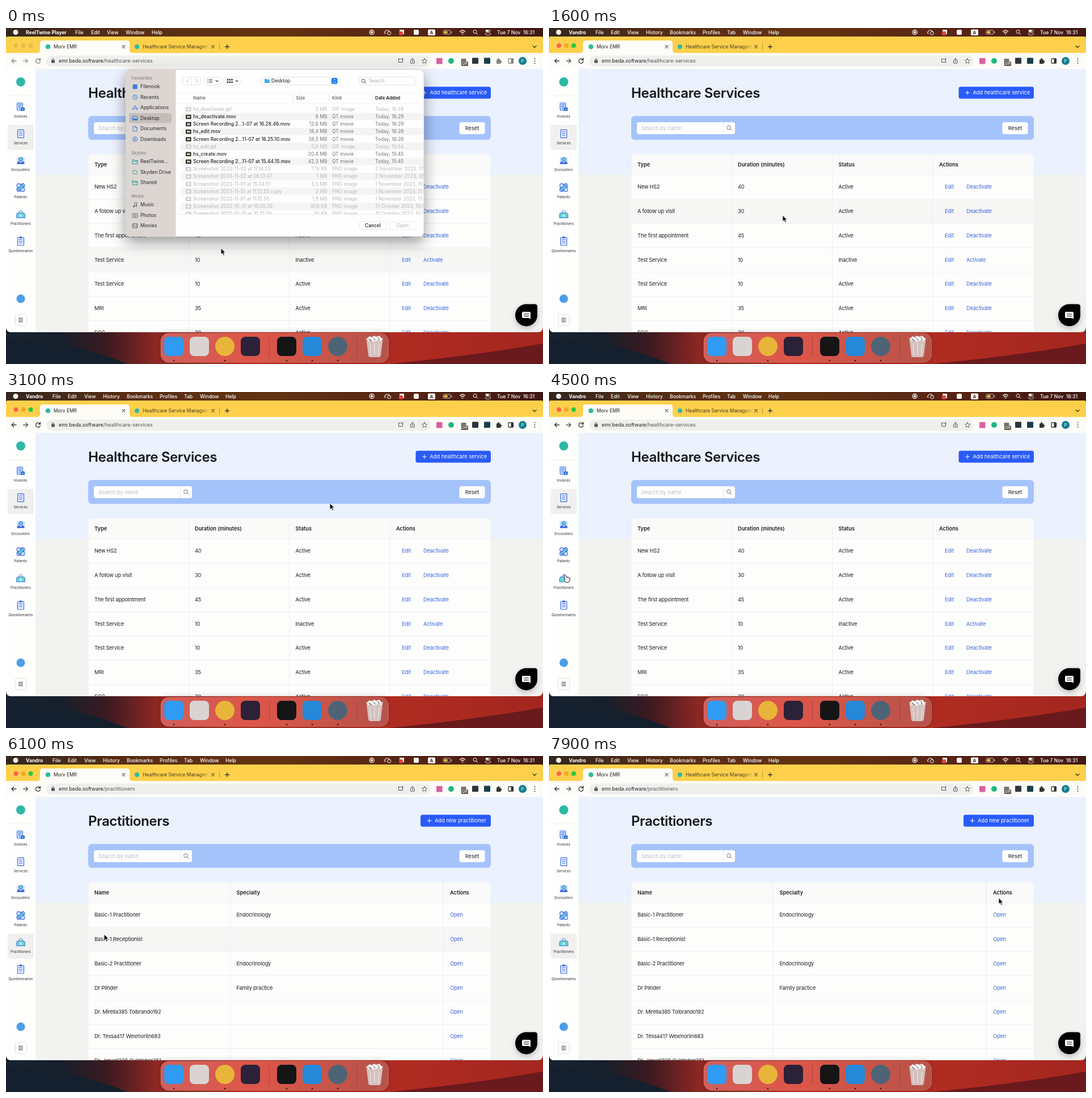
An HTML page that plays this animation: 947x592 px, repeating every 8 s.

```html
<!DOCTYPE html>
<html lang="en">
<head>
<meta charset="utf-8">
<title>Healthcare services walkthrough</title>
<style>
  html, body { margin: 0; width: 100%; height: 100%; overflow: hidden; background: #2a1216; }
  svg { display: block; width: 100%; height: 100%; }
  text { font-family: Inter, "Open Sans", sans-serif; white-space: pre; }
</style>
</head>
<body>
<svg id="stage" viewBox="0 0 947 592"></svg>
<script>
const LOOP = 8000, STEP = 100;
const LEAVE_DIALOG = 600, OPEN_PAGE = 4800, DATA_READY = 5500, LEAVE_MENU = 5500;
const INK = '#1d1d1f', LINK = '#3c65d9', BLUE = '#2a5bf8', LINE = '#efeff3';
const ROW_TOP = 259, ROW_H = 42.75;

const attrs = o => Object.entries(o).map(([k, v]) => ` ${k}="${v}"`).join('');
const rect = (x, y, w, h, fill, r = 0, o = {}) =>
  `<rect${attrs({ x, y, width: w, height: h, fill, rx: r, ...o })}/>`;
const circ = (cx, cy, r, fill, o = {}) => `<circle${attrs({ cx, cy, r, fill, ...o })}/>`;
const fill = (d, color, o = {}) => `<path${attrs({ d, fill: color, ...o })}/>`;
const line = (d, color, w = 1, o = {}) => `<path${attrs({
  d, fill: 'none', stroke: color, 'stroke-width': w,
  'stroke-linecap': 'round', 'stroke-linejoin': 'round', ...o })}/>`;
// y is the middle of the letters
const txt = (x, y, s, size, color = INK, o = {}) =>
  `<text${attrs({ x, y: (y + size * .35).toFixed(2), 'font-size': size, fill: color, ...o })}>${s}</text>`;
const body = (x, y, s, color = INK, o = {}) => txt(x, y, s, 9.2, color, { 'letter-spacing': -.15, ...o });
const group = (id, s, o = {}) => `<g${attrs({ id, ...o })}>${s}</g>`;
const at = (x, y, s) => `<g transform="translate(${x} ${y})">${s}</g>`;
const cross = (x, y, r, c) => line(`M${x - r} ${y - r}l${2 * r} ${2 * r}m0 ${-2 * r}l${-2 * r} ${2 * r}`, c, 1.1);
const plus = (x, y, r, c, w = 1.1) => line(`M${x - r} ${y}h${2 * r}M${x} ${y - r}v${2 * r}`, c, w);
const lens = (x, y, r, c) => circ(x - 1, y - 1, r, 'none', { stroke: c }) +
  line(`M${x - 1 + r * .7} ${y - 1 + r * .7}l${r * .9} ${r * .9}`, c);
const gradient = (id, ...stops) => `<linearGradient id="${id}">` + stops.map(([offset, color]) =>
  `<stop offset="${offset}" stop-color="${color}"/>`).join('') + '</linearGradient>';

const defs = `<defs>
  ${gradient('wall', [0, '#17232f'], [.1, '#15202c'], [.19, '#3d1a20'], [.28, '#8e2823'], [.45, '#c23a2a'], [.72, '#b02c22'], [1, '#a3261f'])}
  ${gradient('bar', [0, '#33271f'], [.2, '#552c14'], [.5, '#633312'], [.75, '#572414'], [1, '#3f1814'])}
  ${gradient('dock', [0, '#d05f5c'], [.4, '#de5648'], [1, '#b6524b'])}
  <linearGradient id="fade"><stop offset=".84" stop-color="#fdd04c" stop-opacity="0"/><stop offset="1" stop-color="#fdd04c"/></linearGradient>
  <clipPath id="page"><path d="M0 72H947V526q0 10-10 10H10Q0 536 0 526z"/></clipPath>
  <clipPath id="files"><rect x="300" y="135" width="436" height="193"/></clipPath>
  <filter id="shadow" x="-20%" y="-20%" width="140%" height="150%"><feDropShadow dx="0" dy="10" stdDeviation="13" flood-opacity=".4"/></filter>
  <filter id="soft" x="-40%" y="-60%" width="180%" height="260%"><feDropShadow dx="0" dy="4" stdDeviation="5" flood-opacity=".22"/></filter>
  <filter id="glow" x="-10%" y="-60%" width="120%" height="220%"><feDropShadow dx="0" dy="0" stdDeviation="6" flood-opacity=".22"/></filter>
</defs>`;

function menuBar() {
  const titles = (list, id) => group(id, list.map(([x, s], i) =>
    txt(x, 7.5, s, 8.6, '#fff', { 'font-weight': i ? 500 : 700 })).join(''));
  const W = '#f7f2f0';
  return rect(0, 0, 947, 16, 'url(#bar)') + circ(17, 7.5, 4.5, W) +
    titles([[35, 'ReelTwine Player'], [122, 'File'], [150, 'Edit'], [178, 'View'], [211, 'Window'], [257, 'Help']], 'menuA') +
    titles([[35, 'Vandro'], [82, 'File'], [109, 'Edit'], [138, 'View'], [171, 'History'], [213, 'Bookmarks'],
      [271, 'Profiles'], [314, 'Tab'], [342, 'Window'], [387, 'Help']], 'menuB') +
    circ(645, 7.5, 4, 'none', { stroke: W, 'stroke-width': 1.3 }) + rect(643, 5.5, 4, 4, W, 1) +
    line('M669 10q-3-2 0-4q1-3 4-2q3 0 3 3', W, 1.2) + circ(675.5, 9, 3, 'none', { stroke: W }) +
    rect(694, 3, 8, 8, W, 1) + rect(693, 6, 7, 7, '#e34234', 2) + rect(719, 3, 9, 9, W, 2) +
    rect(744, 2.5, 13, 10.5, W, 1.5) + txt(750.5, 7.8, 'A', 8, '#3c2723', { 'text-anchor': 'middle', 'font-weight': 600 }) +
    rect(771, 4, 13, 7, 'none', 2, { stroke: '#c9b9b3' }) + rect(772.5, 5.5, 6, 4, '#e9c544', 1) + rect(785, 6, 1.3, 3, '#c9b9b3') +
    line('M800.5 6.2q4.5-4 9 0M802.5 8.6q2.5-2.2 5 0', W, 1.3) + circ(805, 11, 1, W) + lens(828, 7.5, 3, W) +
    rect(845.5, 3, 9, 4, W, 2) + rect(845.5, 8.3, 9, 4, 'none', 2, { stroke: W, 'stroke-width': .8 }) +
    circ(852.3, 5, 1.4, '#4a2922') + txt(866, 7.5, 'Tue 7 Nov  16:31', 8.6, '#fff', { 'font-weight': 500 });
}

function browser() {
  const logo = (x, y, r) => circ(x, y, r, '#2db8a6');
  const lights = [['#ff5f57', 17.5], ['#f6a623', 30.5], ['#28c840', 43.5]];
  const nav = line('M18 58h-8m3.5-3.5L10 58l3.5 3.5', '#333', 1.3) +
    line('M30.500 58h8m-3.500-3.500l3.500 3.500l-3.500 3.500', '#555', 1.3) +
    line('M60 56a4 4 0 1 0 .4 3.200M60.500 53.500v3h-3', '#333', 1.3) +
    fill('M865 55.500h2.300q-.6-2.500 1.300-2.500t1.300 2.500h2.600v2.600q2-.7 2 1.200t-2 1.200v2.500h-7.500z', '#333') +
    rect(886, 54, 8.5, 8, 'none', 1, { stroke: '#333', 'stroke-width': 1.3 }) + rect(890.5, 54, 4, 8, '#333');
  const tools = line('M692.500 54.500v6h7v-3M692.500 54.500h3.500M699 53v3.500m-1.700-1.500l1.700 1.700l1.700-1.700', '#555') +
    line('M714.500 57h-1v5h6.500v-5h-1M716.800 60v-6.500m-2 2l2-2l2 2', '#555') +
    line('M738 53.500l1.400 2.900 3.100.4-2.300 2.200.6 3.100-2.800-1.500-2.800 1.500.6-3.100-2.300-2.200 3.100-.4z', '#555', .9) +
    rect(759, 53, 10.5, 10.5, '#dc5fa3', 1) + circ(785, 58, 5, '#1fb686') +
    rect(802.5, 54, 9, 7, '#777', 1) + rect(803, 59, 12, 8, '#625d50', 1.5) +
    txt(809, 63, 'Off', 6.5, '#fff', { 'text-anchor': 'middle' }) +
    rect(822, 52.5, 11, 10.5, '#2d3440', 1) + rect(843, 52.5, 11, 10.5, '#183f4b', 1);
  return rect(0, 15, 947, 57, '#fdd04c', 3) +
    fill('M55 44q5 0 5-5V27q0-5 5-5h148q5 0 5 5v12q0 5 5 5z', '#fdfcf7') + rect(0, 44, 947, 28, '#fdfcf9') +
    group('lightsOff', lights.map(l => circ(l[1], 31, 4, '#e5bd4b')).join('')) +
    group('lightsOn', lights.map(l => circ(l[1], 31, 4, l[0])).join('')) +
    logo(74, 33, 4.3) + txt(84, 33, 'Morv EMR', 8.4) + cross(207.5, 33, 2.4, '#444') +
    logo(231, 33, 4) + txt(241, 33, 'Healthcare Service Managem', 8.4, '#40391f') + rect(241, 26, 120, 14, 'url(#fade)') +
    cross(365, 33, 2.4, '#443c20') + rect(376, 27, 1, 12, '#b79840') + plus(390, 33, 3.5, '#333', 1.3) +
    line('M929 31.500l3 3l3-3', '#443c20', 1.3) +
    rect(71, 48.5, 678, 19.5, '#efefed', 9.7) +
    rect(80, 56.5, 6, 5, '#555', .8) + line('M81.300 56.500v-1.500q1.700-2.500 3.400 0v1.500', '#555') +
    `<text id="url" x="93" y="61" font-size="8.9" fill="#555"><tspan fill="#222">emr.beda.software</tspan><tspan id="path"></tspan></text>` +
    tools + group('nav', nav) +
    circ(911, 58, 7, '#147f90') + txt(911, 58, 'P', 7.5, '#fff', { 'text-anchor': 'middle' }) +
    [54, 58, 62].map(y => circ(932.5, y, 1, '#444')).join('');
}

function sidebar() {
  const b = '#3768dd', teal = '#64cfd2', pale = '#c9dcff';
  const doc = rect(-5.5, -7, 11, 14, '#e9f0ff', 1, { stroke: b, 'stroke-width': 1.1 }) + line('M-3-3.500h6M-3-.500h6M-3 2.500h6', b, .9);
  const icons = [
    ['Invoices', rect(-6.5, -7, 10, 13, pale, 1, { stroke: b }) + line('M-4-4h5M-4-1h5M-4 2h3', b) + rect(0, 1, 7, 6, b, 1) + circ(3.5, 4, 1.5, teal)],
    ['Services', doc],
    ['Encounters', rect(-7, -6, 14, 10, pale, 1) + circ(0, -2.5, 3.3, teal, { stroke: b }) + fill('M-7 6q1-4 4-5l3 3 3-3q3 1 4 5z', b)],
    ['Patients', [[-3.5, -3.5], [3.5, -3.5], [-3.5, 3.5], [3.5, 3.5]].map(p => circ(...p, 3.6, pale, { stroke: b, 'stroke-width': 1.1 })).join('') +
      rect(-2.3, -6, 4.6, 12, teal, 2, { transform: 'rotate(45)', stroke: b })],
    ['Practitioners', line('M-3-3q0-4 3-4t3 4', b) + fill('M-7.500 6v-6q0-3 4-3h7q4 0 4 3v6z', teal, { stroke: b, 'stroke-width': .8 }) + plus(0, 2, 2, '#fff', 1.4)],
    ['Questionnaires', doc + rect(-2.5, -8.5, 5, 3, b, 1)]
  ];
  return rect(0, 72, 52, 464, '#fefefd') + `<rect id="selected" x="3" width="46" height="44" rx="3" fill="#f0f0ee"/>` +
    circ(26, 95, 8, '#2db8a6') + line('M4 119.500h44', '#f3f2e6', 1) +
    icons.map(([name, art], i) => at(26, 139 + i * 47.4, art) +
      txt(25.8, 155.5 + i * 47.4, name, 6, '#2c2c31', { 'text-anchor': 'middle' })).join('') +
    circ(26, 477, 7.5, '#4a9fe8') + rect(16, 504.5, 20, 20, '#fff', 3, { stroke: '#dad8cf', 'stroke-width': .8 }) +
    line('M22.500 511.500h7M22.500 514.500h7M22.500 517.500h7', '#222', 1);
}

const headings = (y, cells) => cells.map(([x, s]) => body(x, y, s, INK, { 'font-weight': 600, 'letter-spacing': 0 })).join('');
const rules = (xs, bottom) => xs.map(x => line(`M${x} 223V${bottom}`, LINE, 1)).join('');
const rowLines = [...Array(7)].map((_, i) => line(`M146 ${ROW_TOP + i * ROW_H}H854`, LINE, 1)).join('');
const rowY = i => 280.2 + i * ROW_H;

function pageTop(title, action, x) {
  return txt(145, 114.5, title, 24, '#15171c', { 'font-weight': 600, 'letter-spacing': -.4 }) +
    rect(x, 103.5, 855 - x, 21, BLUE, 3.5) + plus(x + 15.5, 114, 3.4, '#fff', 1) +
    body(x + 25, 114, action, '#fff', { 'letter-spacing': 0 });
}

function services() {
  const rows = [['New HS2', 40], ['A follow up visit', 30], ['The first appointment', 45], ['Test Service', 10],
    ['Test Service', 10], ['MRI', 35], ['ECG', 30]];
  return pageTop('Healthcare Services', 'Add healthcare service', 722.5) +
    headings(240.5, [[156, 'Type'], [333, 'Duration (minutes)'], [510.5, 'Status'], [688, 'Actions']]) +
    rules([322.5, 499.5, 677], 536) + rowLines +
    rows.map(([name, min], i) => {
      const y = rowY(i), off = i === 3;
      return body(156, y, name) + body(333, y, min) + body(510.5, y, off ? 'Inactive' : 'Active') +
        body(698, y, 'Edit', LINK) + body(736, y, off ? 'Activate' : 'Deactivate', LINK);
    }).join('');
}

function practitioners() {
  const rows = [['Basic-1 Practitioner', 'Endocrinology'], ['Basic-1 Receptionist', ''], ['Basic-2 Practitioner', 'Endocrinology'],
    ['Dr Plinder', 'Family practice'], ['Dr. Mirella385 Tolbrando192', ''], ['Dr. Tessa417 Wexmorlin683', ''], ['Dr. Jorvall208 Quintober351', '']];
  const empty = '#d5d5d3';
  return pageTop('Practitioners', 'Add new practitioner', 731) +
    headings(240.5, [[156, 'Name'], [406.5, 'Specialty'], [783, 'Actions']]) +
    rules([395.5, 771], 259) +
    group('loaded', rules([395.5, 771], 536) + rowLines + rows.map(([name, field], i) =>
      body(156, rowY(i), name) + body(406.5, rowY(i), field) + body(783, rowY(i), 'Open', LINK)).join('')) +
    group('empty', line('M146 259H854', LINE) +
      `<ellipse cx="499.500" cy="312" rx="20" ry="4.500" fill="#f1f1ef"/>` +
      fill('M485 301l5.500-10.500h18l5.500 10.500v13h-29z', '#fcfcfb', { stroke: empty }) +
      line('M485 301h8.500q1 4 3 4h6q2 0 3-4h8.500', empty) +
      body(499.5, 329, 'No data', '#b8b8b6', { 'text-anchor': 'middle' }) +
      body(434, 515.5, 'Made with', '#777') +
      fill('M484.500 519.500c-7-4.500-4-9.500 0-6.300c4-3.200 7 1.800 0 6.300z', '#e2262c') + body(491, 515.5, 'by', '#777') +
      body(503, 515.5, 'Morv Software', '#666', { 'text-decoration': 'underline' }));
}

function page() {
  return group('content', rect(0, 72, 947, 464, '#f2f2f0') + rect(52, 72, 895, 186.5, '#ebf1fd') +
    rect(145, 155, 710, 42, '#a5c3fb', 6) + rect(155, 166, 173, 21, '#fefefe', 3.5) +
    body(163, 176.5, 'Search by name', '#bcbcc0', { 'letter-spacing': 0 }) + line('M307.500 166v21', '#dedee0', .8) + lens(318, 176.5, 3.4, '#777') +
    rect(799.5, 166, 45, 21, '#fff', 3.5) + body(822, 176.5, 'Reset', INK, { 'text-anchor': 'middle', 'letter-spacing': 0 }) +
    rect(145.5, 222.5, 709, 37, '#fafaf9', 5) + `<rect id="table" x="145.500" y="259" width="709" fill="#fdfdfc"/>` +
    `<rect id="hover" x="146" width="708" height="${ROW_H}" fill="#f6f6f4"/>` +
    group('services', services()) + group('practitioners', practitioners()) + sidebar() +
    fill('M898 506a19.500 19.500 0 0 1 19.500-19.500h15q4.500 0 4.500 4.500v15a19.500 19.500 0 0 1-39 0z', '#050505', { filter: 'url(#soft)' }) +
    fill('M910 502q0-2 2-2h11q2 0 2 2v11l-2.500-2h-10.500q-2 0-2-2z', '#fff') + line('M913.500 504h8M913.500 507.500h8', '#050505', 1.2) +
    group('status', rect(-4, 522.5, 319, 18, '#f8f1cf', 3) +
      txt(3, 529.5, 'Waiting for beda-org-8c49ee4cf73d93716969939.freshchat.com...', 7.8, '#858073')) +
    group('tip', fill('M53.500 335l4-4v8z', '#1d1d1f') + rect(57, 324, 66, 22, '#1d1d1f', 3.5, { filter: 'url(#soft)' }) +
      body(62, 335, 'Practitioners', '#fff')), { 'clip-path': 'url(#page)' });
}

function dialog() {
  const grey = '#8c8582', blue = '#367be0';
  const sections = [['Favourites', 88, 103.5, ['Filenook', 'Recents', 'Applications', 'Desktop', 'Documents', 'Downloads']],
    ['Skyden', 220, 235.5, ['ReelTwine...', 'Skyden Drive', 'Shared']], ['Media', 296, 311.5, ['Music', 'Photos', 'Movies']]];
  const glyph = { Filenook: rect(-4, -4, 8, 8, blue, 1), Recents: circ(0, 0, 4, 'none', { stroke: blue }) + line('M0-2.500v3h2', blue),
    Applications: line('M-4 4l4-8l4 8M-4.500 1.500h9', blue), Desktop: rect(-4.5, -3.5, 9, 7, 'none', 1, { stroke: blue }) + rect(-4, .5, 8, 2.5, blue),
    Documents: line('M-3-4h4l2.500 2.500v6h-6.500zM1-4v2.500h2.500', blue), Downloads: circ(0, 0, 4, 'none', { stroke: blue }) + line('M0-2.200v4m-1.600-1.600l1.600 1.600l1.600-1.600', blue),
    Music: line('M-1 3v-6l4-1v5.500', '#666') + circ(-2, 3, 1.5, '#666') + circ(2, 2, 1.4, '#666'),
    Photos: rect(-4.5, -3, 9, 7, 'none', 1, { stroke: '#666' }) + circ(0, .5, 1.8, 'none', { stroke: '#666' }),
    Movies: rect(-4.5, -3.5, 9, 7, 'none', 1, { stroke: '#666' }) + line('M-2.500-3.500v7M2.500-3.500v7M-2.500 0h5', '#666', .8),
    'Skyden Drive': line('M-3 3q-3-1-1-4q1-3 4-2q3-1 4 3q1 2-1 3z', '#2b9d98') };
  const folder = line('M-4.500 3.500v-7h3l1 1.500h5v5.500zM-4.500-.500h9', '#2b9d98');
  const side = sections.map(([head, y, first, names]) => txt(221, y, head, 7.4, grey, { 'font-weight': 500 }) +
    names.map((n, i) => at(227.5, first + i * 18.45, glyph[n] || folder) + txt(237, first + i * 18.45, n, 8.5, '#292522', { 'letter-spacing': .05 })).join('')).join('');
  const gif = 'GIF Image', mov = 'QT movie', png = 'PNG image';
  const files = [['hs_deactivate.gif', '2 MB', gif, 'Today, 16:29'], ['hs_deactivate.mov', '6 MB', mov, 'Today, 16:29'],
    ['Screen Recording 2...1-07 at 16.28.46.mov', '12,6 MB', mov, 'Today, 16:29'], ['hs_edit.mov', '18,4 MB', mov, 'Today, 16:26'],
    ['Screen Recording 2...11-07 at 16.25.10.mov', '38,5 MB', mov, 'Today, 16:26'], ['hs_edit.gif', '5,6 MB', gif, 'Today, 15:54'],
    ['hs_create.mov', '20,4 MB', mov, 'Today, 15:45'], ['Screen Recording 2...11-07 at 15.44.15.mov', '42,3 MB', mov, 'Today, 15:45'],
    ['Screenshot 2023-11-02 at 17.14.53', '776 KB', png, '2 November 2023, 17:14'], ['Screenshot 2023-11-02 at 06.13.47', '1 MB', png, '2 November 2023, 06:13'],
    ['Screenshot 2023-11-01 at 15.34.51', '5,5 MB', png, '1 November 2023, 15:34'], ['Screenshot 2023-11-01 at 11.12.55 copy', '2 MB', png, '1 November 2023, 11:13'],
    ['Screenshot 2023-11-01 at 11.12.55', '1,9 MB', png, '1 November 2023, 11:12'], ['Screenshot 2023-10-31 at 16.00.26', '906 KB', png, '31 October 2023, 16:00'],
    ['Screenshot 2023-10-31 at 10.31.20', '35 KB', png, '31 October 2023, 10:31']];
  const list = files.map(([name, size, kind, date], i) => {
    const y = 143 + i * 13.17, on = kind === mov, c = on ? '#202022' : '#b4b4b4', meta = on ? '#737373' : '#b9b9b9';
    const cell = (x, s, color, o = {}) => txt(x, y, s, 8.3, color, { 'letter-spacing': .09, ...o });
    return (i % 2 ? rect(308, y - 6.5, 428, 13, '#f4f4f3', 2) : '') +
      rect(317, y - 3.5, 9.5, 7.5, on ? '#29231f' : '#c9ccce', 1) + rect(319, y - 1.5, 5.5, 3.5, on ? '#d8cbbb' : '#f3f3f3') +
      cell(330, name, c, { 'font-weight': on ? 500 : 400 }) + cell(566.5, size, meta, { 'text-anchor': 'end' }) +
      cell(575, kind, meta) + cell(651, date, meta);
  }).join('');
  const box = (x, y, w, h, o = {}) => rect(x, y, w, h, '#fff', 3.5, { stroke: '#deddda', 'stroke-width': .8, ...o });
  const chev = x => line(`M${x - 2} 92.500l2 2l2-2`, '#444', 1.1);
  return group('dialog', rect(211, 73, 526, 294.5, '#fefefe', 8, { filter: 'url(#shadow)', stroke: '#aaa', 'stroke-width': .5 }) +
    fill('M299.500 73H219q-8 0-8 8v278.500q0 8 8 8h80.500z', '#dcd6d3') + rect(217, 150, 75, 17.5, '#c4bdba', 4) + side +
    box(312, 86.5, 31, 14) + line('M327.500 87v13', '#deddda', .7) + line('M321 90.500l-2.500 2.800l2.500 2.800M335 90.500l2.500 2.800l-2.500 2.800', '#aaa') +
    box(350, 86.5, 29, 14) + line('M355.500 90.500h1M355.500 93.300h1M355.500 96h1M358.500 90.500h5M358.500 93.300h5M358.500 96h5', '#444') + chev(372) +
    box(384, 86.5, 29, 14) + [0, 1, 2].map(i => rect(389.5 + i * 3.8, 89.5, 2.8, 3, '#555') + rect(389.5 + i * 3.8, 94, 2.8, 3, '#555')).join('') + chev(407) +
    box(450, 86.5, 138, 14) + fill('M456 97v-7.500h3.500l1 1.200h4.500v6.300z', '#45b2e8') + txt(468, 93.5, 'Desktop', 8.5) +
    rect(574, 88, 10.5, 10.5, '#1977ee', 2.5) + line('M577.300 92l2-2l2 2M577.300 94.500l2 2l2-2', '#fff') +
    box(623, 86.5, 99, 14) + lens(631, 94, 3, '#555') + txt(640, 93.5, 'Search', 8.3, '#aaa') +
    line('M300 114h436M300 133h436', '#ecece9', .8) + line('M506.500 117v13M570.500 117v13M646.500 117v13', '#dcdcda', .8) +
    [[330, 'Name'], [511.5, 'Size'], [575, 'Kind']].map(([x, s]) => txt(x, 123.5, s, 7.8, '#555', { 'font-weight': 500 })).join('') +
    txt(651, 123.5, 'Date Added', 7.8, INK, { 'font-weight': 600 }) +
    group('list', list, { 'clip-path': 'url(#files)' }) + line('M300 328.500h436', '#e7e7e4', .8) +
    box(623, 341, 48, 14) + txt(647, 348, 'Cancel', 8.4, INK, { 'text-anchor': 'middle', 'font-weight': 500 }) +
    box(676, 341, 47, 14, { opacity: .6 }) + txt(699.5, 348, 'Open', 8.4, '#b5b5b5', { 'text-anchor': 'middle' }));
}

function dock() {
  const tile = (x, c) => rect(x - 17, 544, 34, 34, c, 8);
  return rect(273, 538, 401.5, 51, 'url(#dock)', 14, { filter: 'url(#glow)' }) +
    rect(273, 538, 401.5, 51, 'none', 14, { stroke: '#f0a196', 'stroke-opacity': .4 }) +
    tile(296, '#2f9bf3') + tile(341, '#d9d4d3') + circ(386, 561, 17, '#e8b53a') + tile(431, '#2b2238') +
    tile(495, '#151516') + tile(540, '#2588d8') + circ(585, 561, 17, '#4e6476') +
    rect(464, 545, 1, 35, '#8d3a35', 0, { opacity: .6 }) + rect(618, 545, 1, 35, '#8d3a35', 0, { opacity: .6 }) +
    fill('M635.500 547h29l-3.500 30q-.5 3-4 3h-14q-3.500 0-4-3z', '#d9d5d3', { opacity: .85 }) +
    fill('M637 547l4-4 4 2 4-3 4 2 5-2 5 5-2 5-6-2-5 3-6-3-5 2z', '#f5f5f4') + line('M640 548l4 3M648 546l3 4M656 545l2 5', '#55504e', 1.2) +
    line('M635.500 547h29M642 556l1.500 20M650 556v20M658 556l-1.500 20', '#f4f0ee', .9) +
    [296, 386, 495, 540, 585].map(x => circ(x, 586, 1.3, '#2b1010')).join('');
}

const pointer = group('arrow', fill('M0 0v11.200l2.600-2.400l1.900 4.200l2-.9l-1.900-4.100h3.600z', '#080808', { stroke: '#fff', 'stroke-width': .9 })) +
  group('hand', fill('M-1.500-3q1.500-1.500 2.500 0l2 3.500q1-1.200 2 0q1.200-.8 2 .5q1.500-.5 1.700 1.300v4l-2 3h-5l-4-4q-.7-1.500 1.300-1.200l1.200.600z', '#fff', { stroke: '#111', 'stroke-width': 1 }));

document.getElementById('stage').innerHTML = defs + rect(0, 0, 947, 592, 'url(#wall)') +
  fill('M0 592V545Q110 550 215 592z', '#14202d') + fill('M675 592Q820 578 947 556V592z', '#6a1a1c') +
  menuBar() + browser() + page() + dialog() + dock() + group('cursor', pointer);

const el = id => document.getElementById(id);
const show = (id, on) => { el(id).style.display = on ? '' : 'none'; };
const track = [[0, 379, 388], [600, 379, 388], [1600, 412, 330], [1900, 412, 330], [3000, 571, 196], [3400, 571, 196],
  [4300, 28, 326], [5500, 28, 326], [6100, 173, 314], [6300, 173, 314], [7800, 793, 250], [LOOP, 793, 250]];

function cursorAt(t) {
  const i = track.findIndex((_, n) => t < track[n + 1][0]);
  const [t0, x0, y0] = track[i], [t1, x1, y1] = track[i + 1];
  const p = (t - t0) / (t1 - t0), k = p * p * (3 - 2 * p);
  return [x0 + (x1 - x0) * k, y0 + (y1 - y0) * k];
}

function render(t) {
  const active = t >= LEAVE_DIALOG, second = t >= OPEN_PAGE, loaded = t >= DATA_READY;
  const [x, y] = cursorAt(t), hand = active && x < 50;
  show('dialog', !active); show('menuA', !active); show('menuB', active);
  show('lightsOff', !active); show('lightsOn', active);
  el('nav').setAttribute('opacity', active ? 1 : .6);
  el('path').textContent = second ? '/practitioners' : '/healthcare-services';
  show('services', !second); show('practitioners', second);
  show('loaded', loaded); show('empty', !loaded);
  el('table').setAttribute('height', second && !loaded ? 109 : 277);
  el('selected').setAttribute('y', second ? 313 : 170.8);
  show('tip', second && t < LEAVE_MENU);
  el('status').setAttribute('opacity', second ? Math.max(0, Math.min(1, (5500 - t) / 300)) : 0);

  const row = Math.floor((y - ROW_TOP) / ROW_H);
  show('hover', row >= 0 && x > 146 && x < 854 && (!second || loaded));
  el('hover').setAttribute('y', ROW_TOP + Math.max(0, row) * ROW_H);
  show('hand', hand); show('arrow', !hand);
  el('cursor').setAttribute('transform', `translate(${x.toFixed(1)} ${y.toFixed(1)})`);
}

const start = performance.now();
function tick() {
  const t = (performance.now() - start) % LOOP;
  render(Math.floor(t / STEP) * STEP);
  requestAnimationFrame(tick);
}
tick();
</script>
</body>
</html>
```
